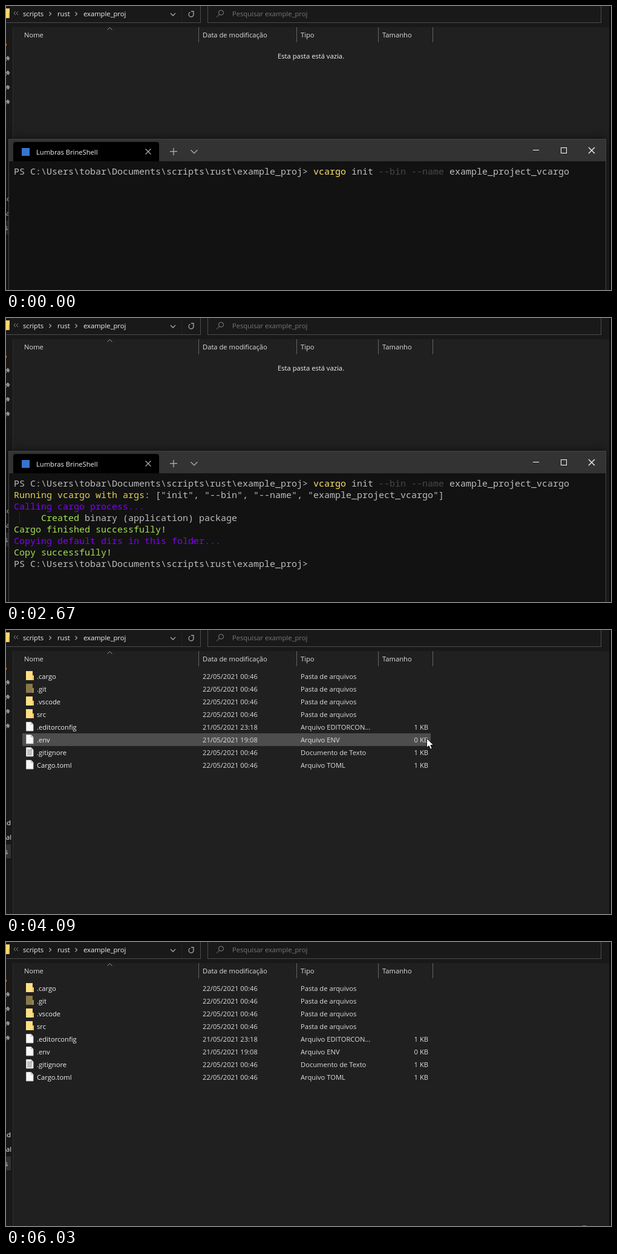
An HTML page with a canvas for the animation above (6.11 s loop, 1000x470 px).

```html
<!DOCTYPE html>
<html lang="pt-BR">
<head>
<meta charset="utf-8">
<style>
html, body { margin: 0; width: 100%; height: 100%; overflow: hidden; background: #191919; }
canvas { display: block; }
</style>
</head>
<body>
<canvas id="stage" width="1000" height="470"></canvas>
<script>
const ctx = document.getElementById('stage').getContext('2d');
const LOOP = 6110;
const UI = '11.2px "Open Sans", sans-serif';
const MONO = '15px "Noto Sans Mono", monospace';
const CHAR = 9, LINE = 19, LEFT = 13, TOP = 265;
const GRAY = '#bdbdbd', YELLOW = '#ddd05c', GREEN = '#a5df55', PURPLE = '#8200f5';
const PROMPT = 'PS C:\\Users\\tobar\\Documents\\scripts\\rust\\example_proj> ';

const files = [
  ['.cargo', '22/05/2021 00:46', 'Pasta de arquivos', '', 'folder'],
  ['.git', '22/05/2021 00:46', 'Pasta de arquivos', '', 'dim'],
  ['.vscode', '22/05/2021 00:46', 'Pasta de arquivos', '', 'folder'],
  ['src', '22/05/2021 00:46', 'Pasta de arquivos', '', 'folder'],
  ['.editorconfig', '21/05/2021 23:18', 'Arquivo EDITORCON...', '1 KB', 'file'],
  ['.env', '21/05/2021 19:08', 'Arquivo ENV', '0 KB', 'file'],
  ['.gitignore', '22/05/2021 00:46', 'Documento de Texto', '1 KB', 'text'],
  ['Cargo.toml', '22/05/2021 00:46', 'Arquivo TOML', '1 KB', 'file']
];

// Each line: time of appearance, then pairs of text and colour.
const lines = [
  [0, PROMPT, GRAY, 'vcargo', '#ffe468', ' init ', GRAY, '--bin --name ', '#474747', 'example_project_vcargo', GRAY],
  [2060, 'Running vcargo with args: ', YELLOW, '["init", "--bin", "--name", "example_project_vcargo"]', GRAY],
  [2060, 'Calling cargo process...', PURPLE],
  [2330, '     Created', GREEN, ' binary (application) package', GRAY],
  [2330, 'Cargo finished successfully!', GREEN],
  [2330, 'Copying default dirs in this folder...', PURPLE],
  [2400, 'Copy successfully!', GREEN],
  [2400, PROMPT, GRAY]
];

// Text caret: start, end, column, row
const carets = [[860, 1390, 102, 0], [1990, 2060, 102, 0], [2060, 2330, 0, 3],
  [2400, 2670, 55, 7], [3200, 3740, 55, 7]];

const within = (t, a, b) => t >= a && t < b;
const lerp = (a, b, u) => a + (b - a) * u;
const ease = u => u * u * (3 - 2 * u);

function box(x, y, w, h, color) {
  ctx.fillStyle = color;
  ctx.fillRect(x, y, w, h);
}

function label(text, x, y, color = '#dedede', align = 'left') {
  ctx.font = UI;
  ctx.textAlign = align;
  ctx.fillStyle = color;
  ctx.fillText(text, x, y + 4);
}

function trace(points, color, width = 1, fill) {
  ctx.beginPath();
  points.forEach(([x, y]) => ctx.lineTo(x, y));
  if (fill) {
    ctx.closePath();
    ctx.fillStyle = fill;
    ctx.fill();
  }
  ctx.strokeStyle = color;
  ctx.lineWidth = width;
  ctx.stroke();
}

const chevronRight = (x, y, s = 3) =>
  trace([[x - s / 2, y - s], [x + s / 2, y], [x - s / 2, y + s]], '#a8a8a8', 1.2);
const chevronDown = (x, y, s, color) =>
  trace([[x - s, y - s / 2], [x, y + s / 2], [x + s, y - s / 2]], color, 1.3);

function disc(x, y, r, color) {
  ctx.beginPath();
  ctx.arc(x, y, r, 0, 7);
  ctx.fillStyle = color;
  ctx.fill();
}

function cross(x, y, s, color) {
  trace([[x - s, y - s], [x + s, y + s]], color, 1.2);
  trace([[x - s, y + s], [x + s, y - s]], color, 1.2);
}

function drawSidebar() {
  box(0, 35, 11, 435, '#191919');
  box(11, 35, 1, 435, '#2d2d2d');
  box(0, 62, 1, 4, '#d8732c');
  for (const y of [87, 111, 135, 159]) {
    trace([[0, y + 4], [2, y + 1]], '#8c8c8c', 1);
    trace([[0, y - 1], [3, y - 4], [6, y - 1], [4, y + 3]], '#8c8c8c', 1, '#8c8c8c');
  }
  box(0, 355, 8, 23, '#333');
  label('nd', 8, 319, '#eee', 'right');
  label('al', 9, 343, '#eee', 'right');
  label('s', 3, 367, '#eee', 'right');
}

function drawAddress(t) {
  box(0, 4, 6, 16, '#ffd86c');
  box(4, 11, 2, 9, '#e8b94b');
  for (const x of [13, 17]) trace([[x + 3, 9], [x, 12], [x + 3, 15]], '#888');
  label('scripts', 28, 13, '#f2f2f2');
  label('rust', 85, 13, '#f2f2f2');
  label('example_proj', 128, 13, '#f2f2f2');
  chevronRight(73, 13);
  chevronRight(116, 13);
  if (within(t, 4270, 6030)) chevronRight(210.5, 13.5);
  box(0, 27, 322, 1, '#4c4c4c');
  box(321, 0, 1, 27, '#4c4c4c');
  box(290, 0, 1, 27, '#222');
  chevronDown(276, 14, 4, '#a8a8a8');
  ctx.beginPath();
  ctx.arc(306, 14, 4, -0.4, 4.3);
  ctx.strokeStyle = '#a8a8a8';
  ctx.lineWidth = 1.3;
  ctx.stroke();
  trace([[306, 9], [310, 9], [310, 13]], '#a8a8a8', 1.3);
  box(333, 0, 1, 28, '#4c4c4c');
  box(333, 27, 651, 1, '#4c4c4c');
  box(983, 0, 1, 27, '#4c4c4c');
  ctx.beginPath();
  ctx.arc(355.5, 11, 4, 0, 7);
  ctx.strokeStyle = '#858585';
  ctx.lineWidth = 1;
  ctx.stroke();
  trace([[352.5, 14], [348, 18.5]], '#858585');
  label('Pesquisar example_proj', 374, 13, '#777');
}

function drawIcon(kind, y) {
  if (kind === 'folder' || kind === 'dim') {
    const dim = kind === 'dim';
    box(33, y - 8, 11, 15, dim ? '#89774c' : '#ffdf85');
    box(43, y - 1, 3, 8, dim ? '#988454' : '#f5cc62');
    return;
  }
  trace([[33.5, y - 7.5], [41.5, y - 7.5], [45, y - 4], [45, y + 7], [33.5, y + 7]], '#c8c8c8', 1, '#f7f7f7');
  trace([[41.5, y - 7], [41.5, y - 4], [45, y - 4]], '#aaa');
  if (kind === 'text') for (let i = 0; i < 5; i++) box(35, y - 4 + i * 2, 8, 1, '#8a8a8a');
}

function drawFiles(t) {
  const hover = within(t, 4090, 4470) ? 5 : within(t, 4470, 4540) ? 6 : -1;
  files.forEach(([name, date, type, size, icon], i) => {
    const y = 77 + 21 * i;
    if (i === hover) box(27, y - 11, 675, 21, '#4d4d4d');
    drawIcon(icon, y - 1);
    label(name, 51, y, '#f0f0f0');
    label(date, 325, y);
    label(type, 487, y);
    label(size, 698, y, '#dedede', 'right');
  });
}

function drawExplorer(t) {
  box(0, 0, 1000, 470, '#191919');
  box(12, 35, 985, 435, '#202020');
  box(997, 0, 3, 470, '#0b0d10');
  drawAddress(t);
  drawSidebar();
  trace([[167.5, 39.5], [171.5, 35.5], [175.5, 39.5]], '#999');
  label('Nome', 30, 48);
  label('Data de modificação', 325, 48);
  label('Tipo', 487, 48);
  label('Tamanho', 622, 48);
  for (const x of [318, 480, 615, 705]) box(x, 35, 1, 25, '#636363');
  if (t < 4090) label('Esta pasta está vazia.', 504, 83, '#f4f4f4', 'center');
  else drawFiles(t);
}

function drawTerminal(t) {
  ctx.shadowColor = 'rgba(0,0,0,.55)';
  ctx.shadowBlur = 14;
  box(4, 220, 988, 260, '#444');
  ctx.shadowBlur = 0;
  box(5, 221, 986, 36, '#333');
  box(5, 257, 986, 213, '#121212');
  ctx.beginPath();
  ctx.roundRect(12, 225, 241, 32, [4, 4, 0, 0]);
  ctx.fillStyle = '#000';
  ctx.fill();
  box(26, 235, 13, 13, '#3674cf');
  label('Lumbras BrineShell', 50, 242, '#f5f5f5');
  cross(235, 241, 4.5, '#aaa');
  box(271, 240, 12, 1.4, '#aaa');
  box(276.3, 235, 1.4, 12, '#aaa');
  chevronDown(311, 241, 5.5, '#aaa');
  box(871, 238, 10, 1, '#fff');
  ctx.strokeStyle = '#fff';
  ctx.lineWidth = 1;
  ctx.strokeRect(917.5, 234.5, 9, 9);
  cross(968, 239, 5, '#fff');

  ctx.font = MONO;
  ctx.textAlign = 'left';
  lines.forEach(([start, ...parts], row) => {
    if (t < start) return;
    let x = LEFT;
    for (let i = 0; i < parts.length; i += 2) {
      ctx.fillStyle = parts[i + 1];
      ctx.fillText(parts[i], x, TOP + row * LINE + 14);
      x += parts[i].length * CHAR;
    }
  });
  if (t >= 2330) box(22, 322, 1, 19, '#242424');
  for (const [a, b, col, row] of carets)
    if (within(t, a, b)) box(LEFT + col * CHAR, TOP + row * LINE, 1, LINE, '#eee');
}

function pointerAt(t) {
  const step = (start, gap, count) => Math.min(count, Math.floor((t - start) / gap));
  if (within(t, 70, 1990)) {
    const k = step(70, 73.75, 8);
    if (k === 8) return [831, 262];
    const u = ease(k / 7);
    return [lerp(906, 831, u), lerp(438, 253, u)];
  }
  if (within(t, 3530, 4470)) {
    const u = ease(step(3530, 70, 4) / 4);
    return [lerp(831, 695, u), lerp(262, 179, u)];
  }
  if (within(t, 4470, 6030)) {
    const u = step(4470, 70, 5) / 5;
    return [lerp(682, 660, u), lerp(218, 412, u * (1.4 - 0.4 * u))];
  }
}

function drawPointer(t) {
  const p = pointerAt(t);
  if (!p) return;
  const [x, y] = p.map(Math.round);
  const arrow = [[0, 0], [0, 16], [3.7, 12.6], [6.3, 18.3], [9, 17.2], [6.6, 11.6], [11.5, 11.6]];
  trace(arrow.map(([a, b]) => [x + a + 0.3, y + b]), '#000', 1, '#fff');
  if (within(t, 860, 940) || within(t, 3940, 4010)) disc(x - 1, y - 1, 12, 'rgba(255,255,0,.5)');
}

function draw(now) {
  const t = now % LOOP;
  drawExplorer(t);
  if (t < 3940) drawTerminal(t);
  drawPointer(t);
  if (t >= 6030) disc(956, 481, 12, '#777');
  requestAnimationFrame(draw);
}
requestAnimationFrame(draw);
</script>
</body>
</html>
```
